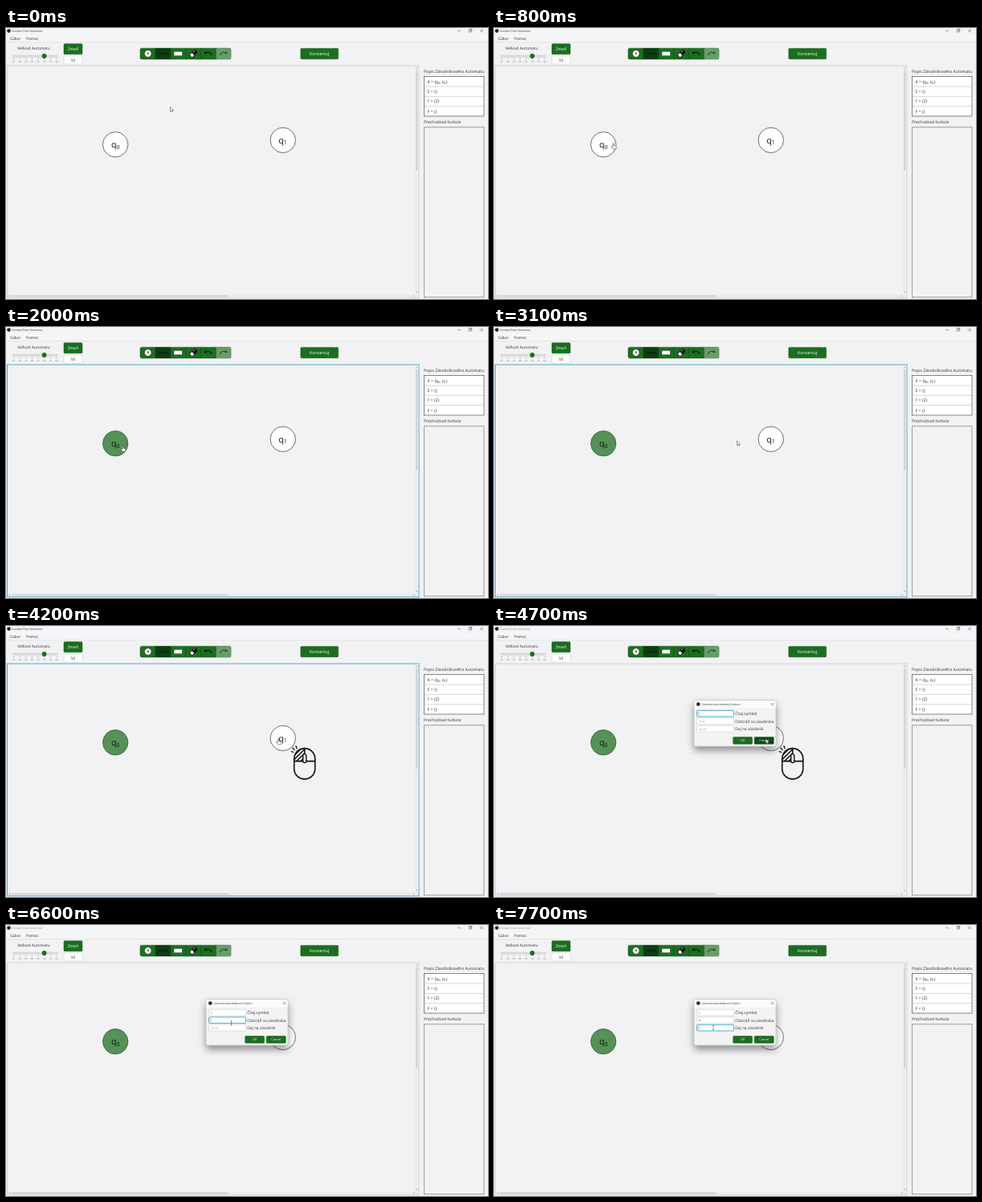
An HTML page for the animation above (8000 ms loop, 600 px wide and 338 px high).

```html
<!DOCTYPE html>
<html lang="sk">
<head>
<meta charset="utf-8">
<title>Automat</title>
<style>
  html, body { margin: 0; width: 100%; height: 100%; overflow: hidden; background: #f2f1f3; }
  svg { display: block; width: 100%; height: 100%; }
  text { font: 5.1px "Open Sans", "Noto Sans", sans-serif; fill: #333; text-rendering: geometricPrecision; }
  .title { font-size: 3.6px; }
  .menu { font-size: 4.8px; }
  .tick { font-size: 2.9px; fill: #777; text-anchor: middle; }
  .button { fill: #1b6e20; stroke: #145217; stroke-width: .5; }
  .on-button { fill: #fff; text-anchor: middle; }
  .small { font-size: 3.8px; }
  .state { fill: #fff; stroke: #333; stroke-width: .7; }
  .state.picked { fill: #569258; stroke: #24512a; }
  .name { font-size: 10.6px; fill: #111; }
  .name tspan { font-size: 7px; }
  .label { font-size: 4.8px; }
  .sub { font-size: 3.4px; }
  .field { fill: #fff; stroke: #c4c4c4; stroke-width: .5; }
  .field.focus, .pane.focus { stroke: #3ba5c9; stroke-width: .9; }
  .pane { fill: #f2f1f4; stroke: #c6c6c8; stroke-width: .7; }
  .prompt { font-size: 3.6px; fill: #aaa; }
  .line { fill: none; stroke: #111; }
  .thin { fill: none; stroke: #444; stroke-width: .5; }
</style>
</head>
<body>
<svg viewBox="0 0 600 338" preserveAspectRatio="none">
  <defs>
    <filter id="shadow" x="-30%" y="-30%" width="160%" height="180%">
      <feDropShadow dx="0" dy="5" stdDeviation="5" flood-opacity=".42"/>
    </filter>
    <clipPath id="leftButton"><path d="M13 0A13 13 0 0 0 0 13V16H13Z"/></clipPath>
  </defs>

  <rect width="600" height="338" fill="#f2f1f3"/>
  <rect width="600" height="8" fill="#f1f4f8"/>
  <rect y="8" width="600" height="9.5" fill="#f5f5f6"/>
  <path d="M0 17.7H600" stroke="#d4d4d6" stroke-width=".5"/>
  <circle cx="3.5" cy="3.6" r="2.3" fill="#222"/>
  <text id="appTitle" class="title" x="7" y="5">Context Free Grammar</text>
  <path class="thin" d="M562.5 3.6h3.5M576.2 2.2h2.8v2.8h-2.8zM577 2.2v-.7h2.8v2.8h-.7M590.3 1.8l3.6 3.6M593.9 1.8l-3.6 3.6"/>
  <text class="menu" x="5" y="14.6">Súbor</text>
  <text class="menu" x="25" y="14.6">Pomoc</text>

  <text x="14.3" y="27" style="font-size:4.9px">Veľkosť Automatu</text>
  <rect x="8.5" y="34" width="56" height="2.2" rx="1.1" fill="#dedee0" stroke="#bbb" stroke-width=".4"/>
  <g id="scale"></g>
  <circle cx="47.6" cy="35" r="2.9" fill="#1b6e20"/>
  <rect class="button" x="72" y="19.7" width="23" height="13" rx="1.2"/>
  <text class="on-button" x="83.5" y="28">Zmeň</text>
  <rect class="field" x="72" y="35" width="23" height="10" rx="1"/>
  <text class="label" x="83.5" y="41.8" text-anchor="middle">50</text>

  <g id="toolbar">
    <rect class="button" x="167" y="25.2" width="113" height="13.7" rx="2"/>
    <rect x="186" y="25.2" width="18.8" height="13.7" fill="#0d3d13"/>
    <path d="M261.3 25.2H278a2 2 0 0 1 2 2v9.700a2 2 0 0 1-2 2H261.3z" fill="#679d69"/>
    <path d="M186 25.2v13.7M204.800 25.2v13.7M223.700 25.2v13.7M242.500 25.2v13.7M261.300 25.2v13.7" stroke="#10420f" stroke-width=".5"/>
    <circle cx="176.700" cy="32" r="4.200" fill="#fff" stroke="#111" stroke-width=".4"/>
    <text class="small" x="176.700" y="33.400" text-anchor="middle" style="font-weight:700">N</text>
    <path class="line" d="M190 32h10.500m-2.200-1.800l2.200 1.800l-2.200 1.800" stroke-width=".9"/>
    <rect x="209" y="29.300" width="10.300" height="5.400" fill="#fff" stroke="#222" stroke-width=".4"/>
    <g transform="translate(233.300 32) rotate(-45)">
      <rect x="-5" y="-2.700" width="10" height="5.400" rx=".8" fill="#111"/>
      <rect x="-4.300" y="-2" width="3.600" height="4" fill="#fff"/>
      <path d="M1-1.500h3" stroke="#fff" stroke-width=".8"/>
    </g>
    <g id="undo">
      <path class="line" d="M248 31.300q5.500-3 8 2.700" stroke-width="1.200"/>
      <path d="M246.300 32l2.300-3.300l1.500 3.600z" fill="#111"/>
    </g>
    <use href="#undo" transform="translate(522.300 0) scale(-1 1)" opacity=".6"/>
  </g>
  <rect class="button" x="366.800" y="25.400" width="46.800" height="13.300" rx="1.200"/>
  <text class="on-button" x="390.200" y="34" style="font-size:5.400px">Konvertuj</text>

  <rect id="pane" class="pane" x="1.500" y="47" width="512.500" height="289.700"/>
  <rect x="509.300" y="47.700" width="4" height="284" fill="#ececee"/>
  <rect x="2" y="332.300" width="511" height="3.800" fill="#ececee"/>
  <rect x="510.400" y="53" width="1.900" height="125" rx=".9" fill="#cfcfd2"/>
  <rect x="7" y="333.500" width="269" height="1.700" rx=".8" fill="#cfcfd2"/>
  <path d="M510.300 50.500l1-1.300l1 1.300zM510.300 329.300l1 1.300l1-1.300zM5 333.300l-1.300 1l1.300 1zM507 333.300l1.300 1l-1.300 1z" fill="#888"/>

  <text x="520" y="55.800">Popis Zásobníkového Automatu</text>
  <rect x="520.500" y="60.500" width="74.500" height="49.500" fill="#fff" stroke="#555" stroke-width=".7"/>
  <path d="M520.500 73h74.500m-74.500 12.400h74.500m-74.500 12.300h74.500" stroke="#aaa" stroke-width=".5"/>
  <text x="524.500" y="68.700">K = {q<tspan class="sub" dy=".8">0</tspan><tspan dy="-.8">, q</tspan><tspan class="sub" dy=".8">1</tspan><tspan dy="-.8">}</tspan></text>
  <text x="524.500" y="81">Σ = {}</text>
  <text x="524.500" y="93.300">Γ = {Z}</text>
  <text x="524.500" y="105.600">F = {}</text>
  <text x="520" y="118.800">Prechodové funkcie</text>
  <rect x="520.500" y="123.800" width="74.500" height="212" fill="#f2f1f4" stroke="#777" stroke-width=".7"/>

  <circle id="q0" class="state" cx="136.200" cy="145.300" r="15.700"/>
  <text class="name" x="131" y="149">q<tspan dy="1.700">0</tspan></text>
  <circle class="state" cx="344.700" cy="139.900" r="15.700"/>
  <text class="name" x="339.300" y="143.600">q<tspan dy="1.700">1</tspan></text>

  <g id="dialog">
    <rect x="249" y="92.700" width="102" height="57.300" rx="2" fill="#f3f3f4" stroke="#999" stroke-width=".4" filter="url(#shadow)"/>
    <path d="M249.200 102.500v-7.600a2 2 0 0 1 2-2h97.600a2 2 0 0 1 2 2v7.600z" fill="#fbfbfc"/>
    <circle cx="254.300" cy="97.500" r="2.300" fill="#222"/>
    <text class="title" x="258.500" y="98.800">Vytvorte prechodovú funkciu</text>
    <path class="thin" d="M344.800 95.800l3.400 3.400m0-3.400l-3.400 3.400"/>
    <g id="fields"></g>
    <rect class="button" x="297.700" y="138.500" width="23.800" height="8.800" rx="1"/>
    <text class="on-button small" x="309.600" y="144.300">OK</text>
    <rect id="cancel" class="button" x="324.200" y="138.500" width="24" height="8.800" rx="1"/>
    <text class="on-button small" x="336.200" y="144.300">Cancel</text>
  </g>

  <g id="mouse" class="line" stroke-width="1.600" stroke-linecap="round">
    <path clip-path="url(#leftButton)" stroke-width="1.500" d="M-1 10l12-12M-1 15l16-16M1 18l16-16M6 18l12-12"/>
    <rect width="26" height="38.300" rx="13"/>
    <path d="M0 16H26M13 0V7"/>
    <rect x="11" y="7" width="4" height="11" rx="2" fill="#f2f1f4" stroke-width="1.400"/>
    <path stroke-width="1.400" d="M3.200-.2L2.300-2.800M.3 1.800L-1.700-.5M-1.200 4.800L-3.300 4"/>
  </g>

  <g id="cursor">
    <path id="arrow" d="M0 0V5.600L1.300 4.500L2.200 6.400L3.100 6L2.300 4.100H4z" fill="#fff" stroke="#333" stroke-width=".5"/>
    <path id="hand" d="M0 .4a.65.65 0 0 1 1.300 0V2.600l2.200.5q.9.300.7 1.300L3.700 7H.4L-1.700 4.200q-.2-1 .7-.8L0 4.200z" fill="#fff" stroke="#222" stroke-width=".5"/>
    <path id="beam" d="M-1 0H1M0 0V5M-1 5H1" fill="none" stroke="#333" stroke-width=".5"/>
  </g>
</svg>
<script>
const LOOP = 8000, STEP = 100;
const $ = id => document.getElementById(id);
const show = (el, on) => el.setAttribute('visibility', on ? 'visible' : 'hidden');
const between = (t, from, to) => t >= from && t < to;

$('scale').innerHTML = Array.from({ length: 8 }, (_, i) => {
  const x = 9.5 + i * 7.65;
  return `<path class="thin" d="M${x} 37.600v1.200"/><text class="tick" x="${x}" y="42.800">${25 + i * 5}</text>`;
}).join('');

// Each field: label, prompt, typed text, focus span, time of typing, caret spans
const fields = [
  { label: 'Čítaj symbol', prompt: '', value: '1', focus: [4500, 6500], typed: 5600, caret: [[4500, 5100], [5600, 6100]] },
  { label: 'Odstráň zo zásobníka', prompt: '(Pop)', value: 'A', focus: [6500, 7400], typed: 7100, caret: [[6500, 7400]] },
  { label: 'Daj na zásobník', prompt: '(Push)', value: '', focus: [7400, LOOP], typed: LOOP, caret: [[7700, LOOP]] }
];
const fieldTop = i => 105.4 + i * 9.5;
$('fields').innerHTML = fields.map((f, i) => {
  const y = fieldTop(i);
  return `<rect class="field" x="252.500" y="${y}" width="46" height="7.600" rx=".8"/>
    <text class="prompt" x="254.700" y="${y + 5.1}"></text>
    <path class="thin" d="M0 ${y + 1.3}v5"/>
    <text class="label" x="300.300" y="${y + 5.6}">${f.label}</text>`;
}).join('');
const fieldParts = fields.map((_, i) => [...$('fields').children].slice(i * 4, i * 4 + 3));

// Pointer stops: time, x, y
const path = [
  [0, 204.5, 98.5], [100, 203, 100], [500, 168, 132], [900, 141.5, 148], [1800, 141.5, 148],
  [2200, 148, 149], [2600, 175, 149], [3100, 302.5, 142], [3300, 328, 141],
  [3500, 337, 140.5], [3800, 338.5, 141], [5700, 338, 140.5], [6000, 318, 131],
  [6400, 280.5, 119.7], [7100, 280.5, 119.7], [7400, 273, 125.5], [LOOP, 273, 125.5]
];
function pointerAt(t) {
  const i = path.findIndex(p => p[0] > t);
  const [t0, x0, y0] = path[i - 1], [t1, x1, y1] = path[i];
  const k = (t - t0) / (t1 - t0);
  return [x0 + (x1 - x0) * k, y0 + (y1 - y0) * k];
}

function pointerShape(x, y, open) {
  if (open) {
    const overField = x > 252 && x < 298.5 && fields.some((_, i) => between(y + 2.5, fieldTop(i), fieldTop(i) + 7.6));
    return overField ? 'beam' : 'arrow';
  }
  const over = (cx, cy) => Math.hypot(x - cx, y - cy) < 15.7;
  return over(136.2, 145.3) || over(344.7, 139.9) ? 'hand' : 'arrow';
}

function render(t) {
  const open = t >= 4500;
  const [x, y] = pointerAt(t);
  const shape = pointerShape(x, y, open);
  $('cursor').setAttribute('transform', `translate(${x} ${y})`);
  for (const id of ['arrow', 'hand', 'beam']) show($(id), id === shape);

  $('q0').classList.toggle('picked', t >= 1300);
  $('pane').classList.toggle('focus', between(t, 1100, 4500));
  $('appTitle').style.fill = open ? '#888' : '#333';

  const firstClick = between(t, 1100, 1800), secondClick = between(t, 4100, 4800);
  show($('mouse'), firstClick || secondClick);
  $('mouse').setAttribute('transform', firstClick ? 'translate(154.200 156.100)' : 'translate(358.700 152.600)');

  $('dialog').style.display = open ? '' : 'none';
  $('cancel').style.fill = x > 324 && y > 138 ? '#0f4a15' : '';
  fields.forEach((f, i) => {
    const [box, text, caret] = fieldParts[i];
    const focused = between(t, ...f.focus), typed = t >= f.typed;
    box.classList.toggle('focus', focused);
    text.textContent = typed ? f.value : focused ? '' : f.prompt;
    text.style.fill = typed ? '#333' : '';
    caret.setAttribute('transform', `translate(${typed ? 257.2 : 254.9} 0)`);
    caret.style.display = f.caret.some(span => between(t, ...span)) ? '' : 'none';
  });
}

const start = performance.now();
function tick() {
  const t = (performance.now() - start) % LOOP;
  render(Math.floor(t / STEP) * STEP);
  requestAnimationFrame(tick);
}
tick();
</script>
</body>
</html>
```
